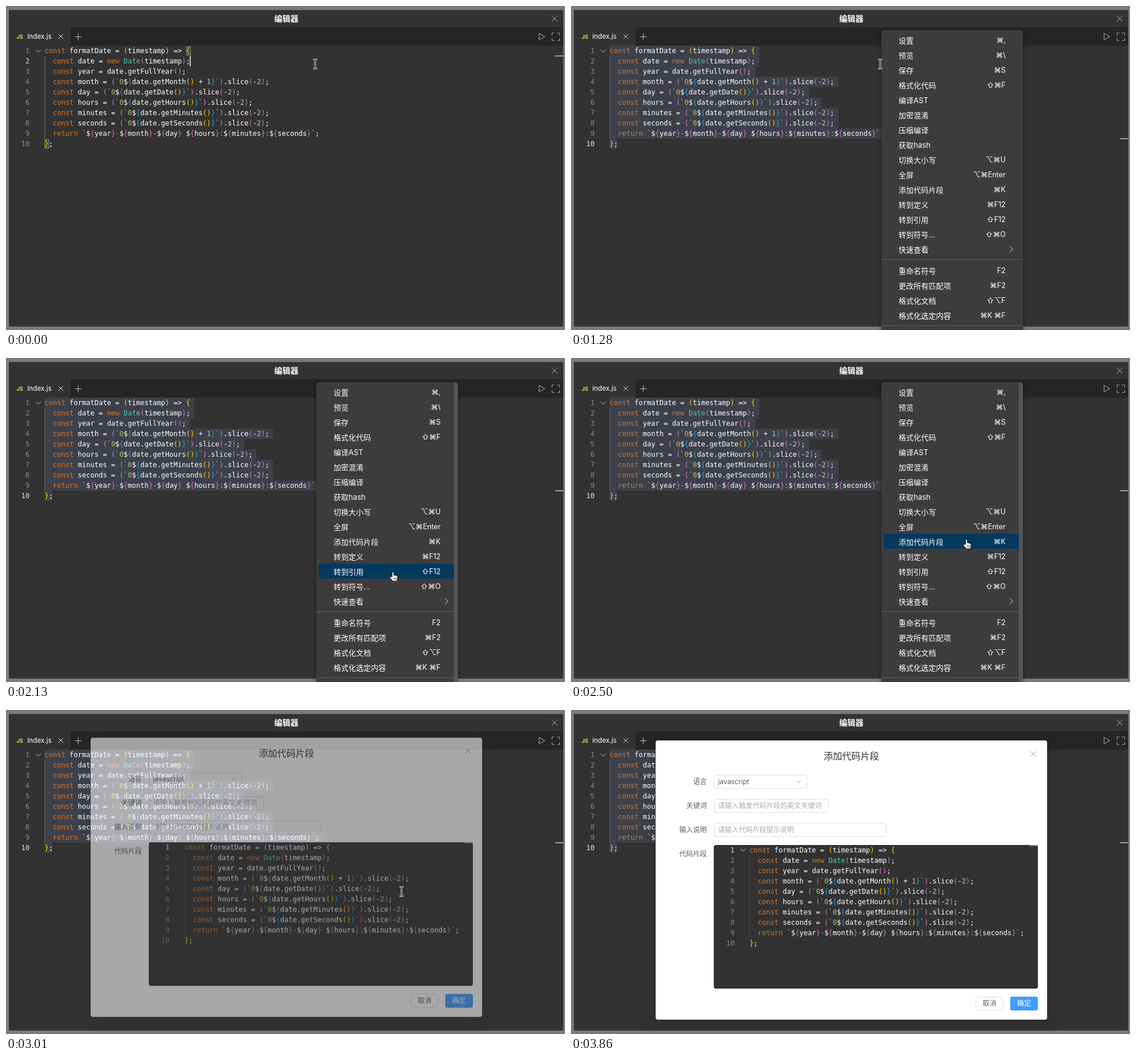
An HTML page that plays this animation: 971 px wide and 564 px high, repeating every 4.64 s.

```html
<!DOCTYPE html>
<html lang="zh-CN">
<head>
<meta charset="utf-8">
<title>编辑器</title>
<style>
html, body { margin: 0; width: 100%; height: 100%; overflow: hidden; background: #7a7a7a; }
#stage { position: absolute; left: 0; top: 0; width: 971px; height: 564px; overflow: hidden;
  font-family: Inter, "Noto Sans CJK SC", "Noto Sans CJK", sans-serif; color: #fff; }
#stage div, #stage svg { position: absolute; box-sizing: border-box; }
.layer, svg { left: 0; top: 0; width: 971px; height: 564px; }
.text { white-space: pre; line-height: 20px; }
.code { white-space: pre; font: 12px/18px "DejaVu Sans Mono", monospace; }
.num { text-align: right; width: 24px; color: #858585; }
.field { border: 1px solid #dcdfe6; border-radius: 4px; background: #fff; }
</style>
</head>
<body>
<div id="stage"></div>
<script>
const LOOP = 4640, HOLD = 'steps(1)';
const stage = document.getElementById('stage');

const add = (parent, cls, css, html = '') => {
  const el = document.createElement('div');
  el.className = cls;
  el.style.cssText = css;
  el.innerHTML = html;
  parent.append(el);
  return el;
};
const layer = parent => add(parent, 'layer', '');
const box = (parent, x, y, w, h, css, cls = '') =>
  add(parent, cls, `left:${x}px;top:${y}px;width:${w}px;height:${h}px;${css}`);
// align: 0 left, 0.5 centre, 1 right
const text = (parent, str, x, cy, size, color = '#fff', align = 0, weight = 400) =>
  add(parent, 'text', `left:${x}px;top:${cy - 10}px;font-size:${size}px;color:${color};` +
    `font-weight:${weight};transform:translateX(${-100 * align}%)`, str);
const icon = (parent, d, stroke, width = 1, fill = 'none') => {
  const holder = layer(parent);
  holder.innerHTML = `<svg overflow="visible"><path d="${d}" fill="${fill}" stroke="${stroke}" ` +
    `stroke-width="${width}" stroke-linejoin="round"/></svg>`;
  return holder;
};
const cross = (parent, x, y, r, color) =>
  icon(parent, `M${x - r} ${y - r}l${2 * r} ${2 * r}m0 ${-2 * r}l${-2 * r} ${2 * r}`, color);
const chevron = (parent, x, y, color) => icon(parent, `M${x - 4.5} ${y - 2}l4.5 4.5 4.5-4.5`, color);

// keys: [ms, value, easing]
const track = (el, prop, keys, ease = HOLD) =>
  el.animate(keys.map(([t, v, e = ease]) => ({ offset: t / LOOP, [prop]: v, easing: e })),
    { duration: LOOP, iterations: Infinity });
const show = (el, from, to = LOOP) =>
  track(el, 'opacity', [[0, from ? 0 : 1], [from, 1], [to, to < LOOP ? 0 : 1], [LOOP, to < LOOP ? 0 : 1]]);

const lines = [
  'const formatDate = (timestamp) => {',
  '  const date = new Date(timestamp);',
  '  const year = date.getFullYear();',
  ...[['month', 'Month() + 1'], ['day', 'Date()'], ['hours', 'Hours()'],
    ['minutes', 'Minutes()'], ['seconds', 'Seconds()']]
    .map(([name, call]) => `  const ${name} = (\`0\${date.get${call}}\`).slice(-2);`),
  '  return `${year}-${month}-${day} ${hours}:${minutes}:${seconds}`;',
  '};'
];
const CHAR = 7.224;
const bracketColors = ['#ffd700', '#da70d6', '#179fff'];

function highlight(src) {
  let depth = 0, literal = false;
  const paint = (color, s) => `<span style="color:${color}">${s}</span>`;
  return src.replace(/\b(?:const|new|return)\b|\bDate\b|\w+|[^\w\s]/g, s => {
    if (s === '`') { literal = !literal; return paint('#a5c261', s); }
    if ('({'.includes(s)) {
      if (s === '{') literal = false;
      return paint(bracketColors[depth++ % 3], s);
    }
    if (')}'.includes(s)) {
      if (s === '}' && depth > 1) literal = true;
      return paint(bracketColors[--depth % 3], s);
    }
    if (s === '$') return s;
    if (literal) return paint('#a5c261', s);
    if (/^(const|new|return)$/.test(s)) return paint('#cc7832', s);
    if (s === 'Date') return paint('#4ec9b0', s);
    if (/^\d/.test(s)) return paint('#b5cea8', s);
    return s === '>' ? '&gt;' : s;
  });
}
const codeHtml = highlight(lines.join('\n'));

const lineNumber = (parent, right, top, n, css = '') =>
  add(parent, 'code num', `left:${right - 24}px;top:${top + 18 * (n - 1)}px;${css}`, n);
function codeBlock(parent, x, top, guide) {
  lines.forEach((_, i) => lineNumber(parent, x - 26, top, i + 1));
  box(parent, x, top + 18, 1, 144, `background:${guide}`);
  add(parent, 'code', `left:${x}px;top:${top}px;color:#fff`, codeHtml);
}

// Window
box(stage, 5, 7, 963, 551, 'background:#323232;border-radius:2px');
box(stage, 112, 37, 856, 32, 'background:#252525');
text(stage, '编辑器', 487, 22, 14, '#fff', .5, 700);
cross(stage, 953, 22, 5, '#aaa');
text(stage, 'JS', 18.5, 53.5, 9, '#f0d93a', 0, 700);
text(stage, 'index.js', 37, 53, 11.7);
cross(stage, 95, 53, 3.8, '#ddd');
icon(stage, 'M119.5 53.5h12m-6-6v12', '#bbb');
icon(stage, 'M926 47.5l10 5.8-10 5.8z', '#aaa');
icon(stage, 'M948.5 51v-4h4m5 0h4v4m0 5v4h-4m-5 0h-4v-4', '#aaa');

// Editor
const selection = layer(stage);
lines.forEach((s, i) => box(selection, 67, 69 + 18 * i, (s.length + (i < 9)) * CHAR, 18,
  'background:#3d4049;border-radius:0 3px 3px 0'));
show(selection, 470);

const brackets = layer(stage);
for (const [x, y] of [[313, 70], [67, 232]])
  box(brackets, x, y, 8, 16, 'border:1px solid #888;background:#3a4438');
show(brackets, 0, 470);

codeBlock(stage, 67, 69, '#666');
chevron(stage, 56, 78, '#bbb');
const activeCss = 'color:#e0e0e0;background:#323232';
show(lineNumber(stage, 41, 69, 2, activeCss), 0, 470);
show(lineNumber(stage, 41, 69, 10, activeCss), 470);

const caret = box(stage, 319, 87, 2, 18, 'background:#c8c8c8');
track(caret, 'opacity', [[0, 1], [120, 1, 'linear'], [200, 0], [LOOP, 0]]);
const ruler = box(stage, 954, 86, 14, 2, 'background:#a0a0a0');
track(ruler, 'top', [[0, '86px'], [530, '230px'], [LOOP, '230px']]);

// Context menu
const menu = layer(stage);
box(menu, 539, 42, 246, 540, 'background:#3c3c3c;border-radius:5px;box-shadow:0 2px 8px rgba(0,0,0,.36)');
const hover = box(menu, 543, 46, 235, 26, 'background:#04395e;border-radius:4px 0 0 4px');
const items = [
  ['设置', '⌘,'], ['预览', '⌘\\'], ['保存', '⌘S'], ['格式化代码', '⇧⌘F'], ['编译AST'], ['加密混淆'],
  ['压缩编译'], ['获取hash'], ['切换大小写', '⌥⌘U'], ['全屏', '⌥⌘Enter'], ['添加代码片段', '⌘K'],
  ['转到定义', '⌘F12'], ['转到引用', '⇧F12'], ['转到符号...', '⇧⌘O'], ['快速查看'],
  ['重命名符号', 'F2'], ['更改所有匹配项', '⌘F2'], ['格式化文档', '⇧⌥F'], ['格式化选定内容', '⌘K ⌘F']
];
items.forEach(([label, keys = ''], i) => {
  const y = 59.5 + 26 * i + (i > 14 ? 11 : 0);
  text(menu, label, 569, y, 13);
  text(menu, keys, 755, y, 12.5, '#fff', 1);
});
icon(menu, 'M762.5 418.5l5 5-5 5', '#ddd');
for (const y of [441, 556]) box(menu, 539, y, 246, 1, 'background:#606060');
const scrollbar = box(menu, 778, 42, 7, 522, 'background:#555;border-radius:0 5px 0 0');

track(menu, 'opacity', [[0, 0], [1100, 0, 'linear'], [1183, 1], [2860, 0], [LOOP, 0]]);
track(scrollbar, 'opacity', [[0, 0], [1370, 0, 'linear'], [1470, 1], [LOOP, 1]]);
show(hover, 1400);
const rows = [[0, 1], [1400, 1], [1460, 3], [1540, 4], [1670, 8], [1800, 12], [2230, 11], [2370, 10], [LOOP, 10]];
track(hover, 'transform', rows.map(([t, r]) => [t, `translateY(${26 * r}px)`]));

// Dialog: overlay and panel fade together
const overlay = layer(stage);
const dialog = layer(overlay);
box(dialog, 147, 52.5, 680, 486, 'background:#fff;border-radius:4px;' +
  'box-shadow:0 12px 32px 4px rgba(0,0,0,.04),0 8px 20px rgba(0,0,0,.08)');
text(dialog, '添加代码片段', 487, 80, 16, '#303133', .5);
cross(dialog, 803, 76.5, 4.5, '#909399');
[['语言', 162, 'javascript'], ['关键词', 200, '请输入触发代码片段的英文关键词'], ['输入说明', 300, '请输入代码片段提示说明'], ['代码片段']]
  .forEach(([label, w, value], i) => {
    const y = 124.5 + 42 * i;
    text(dialog, label, 236, y, 12, '#606266', 1);
    if (!w) return;
    box(dialog, 248, y - 12, w, 24, '', 'field');
    text(dialog, value, 255.5, y, i ? 12 : 11.8, i ? '#a8abb2' : '#606266');
  });
chevron(dialog, 395, 124.5, '#a8abb2');
box(dialog, 248, 234.5, 563, 250, 'background:#323232;border-radius:4px');
codeBlock(dialog, 310, 234.5, '#414141');
lineNumber(dialog, 284, 234.5, 1, activeCss);
box(dialog, 797, 235, 14, 2, 'background:#858585');
show(chevron(dialog, 299, 243.5, '#bbb'), 3160);
box(dialog, 703, 498.5, 48, 24, '', 'field');
text(dialog, '取消', 727, 510.5, 12, '#606266', .5, 500);
const ok = box(dialog, 763, 498.5, 48, 24, 'background:#409eff;border-radius:3px');
text(dialog, '确定', 787, 510.5, 12, '#fff', .5, 500);

const enter = (el, prop, from, to) =>
  track(el, prop, [[0, from], [2873, from, 'ease'], [3173, to], [LOOP, to]]);
enter(overlay, 'opacity', 0, 1);
enter(dialog, 'opacity', 0, 1);
enter(dialog, 'transform', 'translateY(-20px)', 'translateY(0)');
track(ok, 'background', [[0, '#409eff'], [3600, '#79bbff'], [3860, '#409eff'], [LOOP, '#409eff']]);

// Pointer, drawn around its hotspot
const pointer = layer(stage);
const shape = (...paths) => {
  const el = layer(pointer);
  paths.forEach(p => icon(el, ...p));
  return el;
};
const beamPath = 'M-3.5-8Q0-8 0-5.5 0-8 3.5-8M0-6V6M-3.5 8Q0 8 0 5.5 0 8 3.5 8M-2 2.5h4';
const beam = shape([beamPath, '#fff', 2.6], [beamPath, '#111', 1]);
const hand = shape(
  ['M-1.6 9V1.5Q-1.6 0 0 0T1.5 1.5V6Q2.6 5 4 6.3 5.2 5.6 6.3 7 8 6.8 8 8.5V11Q8 13.5 6.5 16H-1' +
    'Q-2 13.5-4.5 11-6.5 8.8-5 8-3.8 7.5-1.6 9Z', '#111', 1, '#fff'],
  ['M1.6 10v3.5M3.7 10v3.5M5.8 10v3.5', '#111', .8]);
const arrow = shape(['M0 0V14.5L3.4 11.5 5.8 16.8 8 15.8 5.7 10.6H10.2Z', '#fff', 1, '#111']);

const path = [
  [0, 537, 101], [1330, 537, 101, 'ease-in-out'], [1600, 669, 339], [1770, 669, 339, 'ease-out'],
  [1830, 672, 373], [2100, 672, 373, 'ease-in-out'], [2500, 687, 316], [3330, 687, 316, 'ease-in-out'],
  [3640, 787, 508, 'linear'], [3720, 791, 512, 'ease-in'], [3830, 832, 555], [LOOP, 832, 555]
];
track(pointer, 'transform', path.map(([t, x, y, e]) => [t, `translate(${x}px,${y}px)`, e]));
show(pointer, 0, 3860);
const kinds = [[0, beam], [1350, hand], [2860, beam], [3560, arrow], [3600, hand], [3760, arrow], [3805, beam], [LOOP, beam]];
for (const el of [beam, hand, arrow])
  track(el, 'opacity', kinds.map(([t, k]) => [t, k === el ? 1 : 0]));
</script>
</body>
</html>
```
